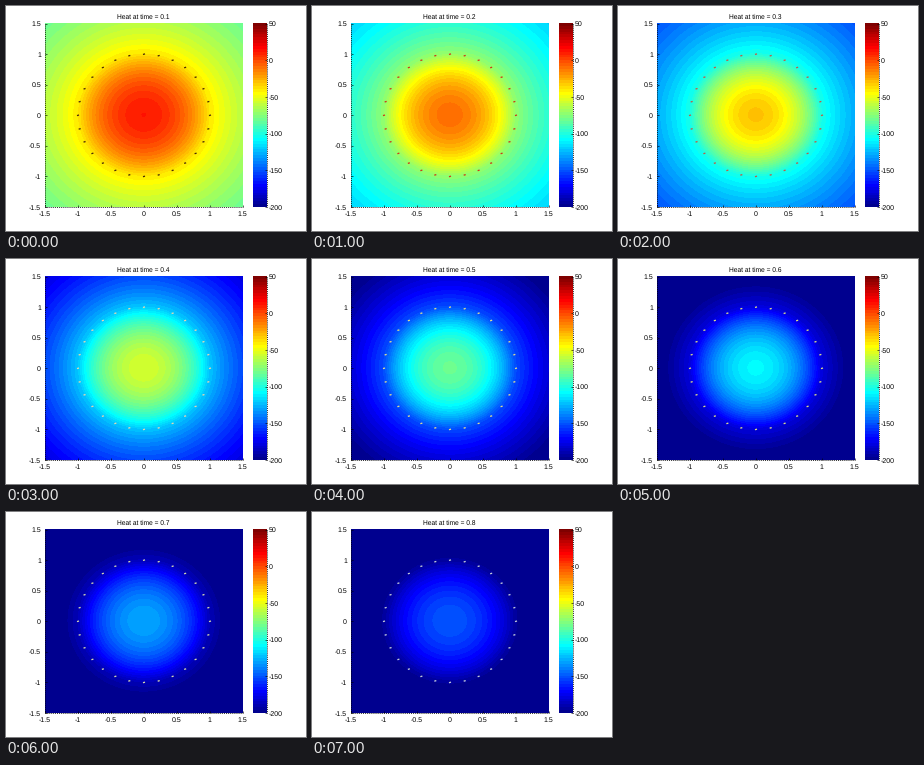
Animation, 300 px wide and 225 px high, one loop 8 s. Source, as a matplotlib script:

```python
import numpy as np
import matplotlib.pyplot as plt
from matplotlib.animation import FuncAnimation
from matplotlib.collections import LineCollection
from matplotlib.colors import ListedColormap

plt.rcParams["text.hinting"] = "none"

W, H, DPI = 300, 225, 100
LEFT, RIGHT, TOP, BOTTOM = 39, 237, 17.6, 201
BAR_L, BAR_R = 247.4, 261
LOW, HIGH = -200, 50
LIM = 1.5

# Per step: value at the centre, parabolic drop to r = 1, log slope outside
PEAK = [11, -10, -31, -56, -82, -109, -130, -150]
DROP = [51, 62, 71, 66, 70, 70, 58, 45]
SLOPE = [55, 62, 64, 76, 70, 60, 55, 40]
MARKS = ["#4a2a08", "#cc3a18", "#c25c44", "#e6d8b0",
         "#e0dc90", "#dedc88", "#d6d8b0", "#c4ccd8"]


def jet64():
    x = np.arange(1, 65) / 64
    return ListedColormap(np.column_stack(
        [np.clip(1.5 - np.abs(4 * x - c), 0, 1) for c in (3, 2, 1)]))


def px(size):
    return size * 72 / DPI


def to_x(v):
    return LEFT + (v + LIM) / (2 * LIM) * (RIGHT - LEFT)


def to_y(v):
    return BOTTOM - (v + LIM) / (2 * LIM) * (BOTTOM - TOP)


def label(x, y, s, ha, size=7):
    return ax.text(x, y, s, ha=ha, va="center_baseline", fontsize=px(size),
                   family="Liberation Sans", color="black")


def line(xs, ys, **kw):
    style = dict(color="black", lw=px(0.6), solid_capstyle="butt")
    style.update(kw)
    ax.plot(xs, ys, **style)


def heat(i):
    inner = np.minimum(radius, 1) ** 2
    outer = np.log(np.maximum(radius, 1))
    return PEAK[i] - DROP[i] * inner - SLOPE[i] * outer


fig = plt.figure(figsize=(W / DPI, H / DPI), dpi=DPI, facecolor="white")
ax = fig.add_axes([0, 0, 1, 1])
cmap = jet64()

gx, gy = np.meshgrid(np.linspace(-LIM, LIM, 396), np.linspace(LIM, -LIM, 368))
radius = np.hypot(gx, gy)
field = ax.imshow(heat(0), cmap=cmap, vmin=LOW, vmax=HIGH, aspect="auto",
                  extent=(LEFT, RIGHT, BOTTOM, TOP), interpolation="nearest")
ax.imshow(np.arange(64)[::-1, None], cmap=cmap, aspect="auto",
          extent=(BAR_L, BAR_R, BOTTOM, TOP), interpolation="nearest")
ax.set_xlim(0, W)
ax.set_ylim(H, 0)
ax.axis("off")

# Dotted edges of the plot and the colour bar
dots = dict(lw=px(0.8), linestyle=(0, (1.2, 1.2)), dash_capstyle="butt")
line([LEFT, LEFT], [TOP, BOTTOM], **dots)
line([LEFT, RIGHT], [BOTTOM, BOTTOM], **dots)
line([BAR_R, BAR_R], [TOP, BOTTOM], **dots)

for v in np.arange(-LIM, LIM + 0.1, 0.5):
    x, y = to_x(v), to_y(v)
    label(x - 0.7, 207, f"{v:g}", "center")
    label(35, y, f"{v:g}", "right")
    line([x, x], [BOTTOM - 2, BOTTOM])
    line([LEFT, LEFT + 2], [y, y])

for v in range(LOW, HIGH + 1, 50):
    y = BOTTOM - (v - LOW) / (HIGH - LOW) * (BOTTOM - TOP)
    label(262.5, y, str(v), "left")
    line([BAR_R - 2, BAR_R], [y, y])

# Short dashes around the unit circle
angles = np.arange(28) * 2 * np.pi / 28
ring = LineCollection(
    [[(to_x(np.cos(a)) - 1, to_y(np.sin(a)) + 0.3),
      (to_x(np.cos(a)) + 1, to_y(np.sin(a)) - 0.3)] for a in angles],
    linewidths=px(1.3), zorder=3)
ax.add_collection(ring)
title = label(137.7, 10, "", "center", 6.6)


def draw(i):
    field.set_data(heat(i))
    ring.set_color(MARKS[i])
    title.set_text(f"Heat at time = {(i + 1) / 10:.1f}")
    return field, ring, title


anim = FuncAnimation(fig, draw, frames=8, interval=1000, repeat=True,
                     repeat_delay=0)
plt.show()
```
